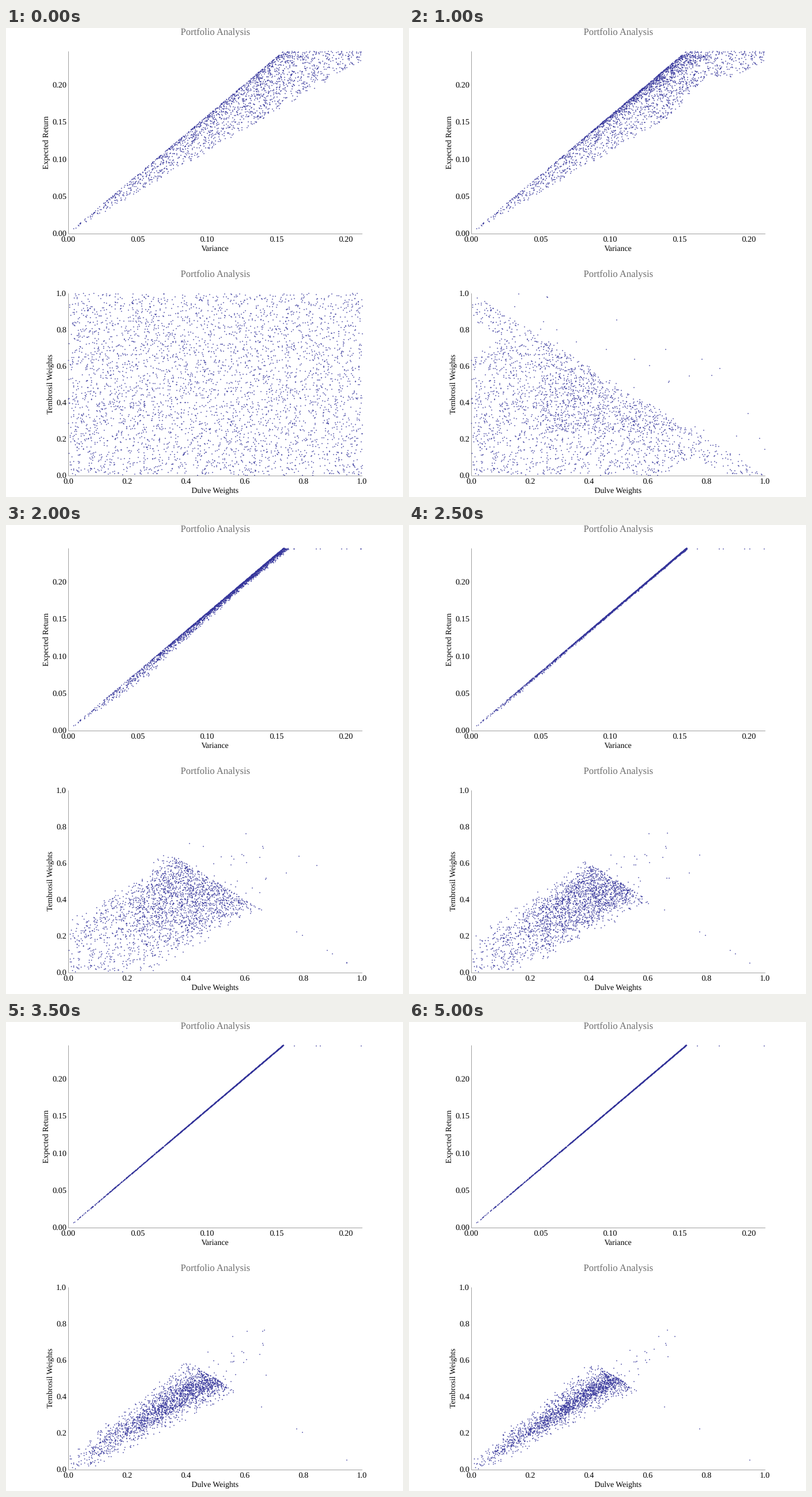
A matplotlib script for the animation above (5500 ms loop, 689 px wide and 812 px high).

```python
import numpy as np
import matplotlib.pyplot as plt
from matplotlib.animation import FuncAnimation

plt.rcParams["text.hinting"] = "none"

W, H, DPI = 689, 812, 64
FRAMES, STEP_MS = 11, 500
BLUE, AXIS, TITLE = "#35359b", "#a0a0a0", "#6e6e6e"
LEFT, RIGHT = 108, 618
TOP_Y, TOP_BASE = 40, 355
LOW_Y, LOW_BASE = 459, 774

RETURN_SPAN = TOP_BASE - TOP_Y     # full investment reaches the top edge
RISK_SPAN = 373                    # least risk at full investment, in pixels
RISK_GAIN = 1.064                  # extra risk from an unbalanced mix

PORTFOLIOS, CHILDREN, STRAYS = 3900, 480, 28

rng = np.random.default_rng(11)


def join(total, diff):
    return np.column_stack([(total + diff) / 2, (total - diff) / 2])


def settle(k):
    """Progress of the search, 0 to 1."""
    return np.clip((k - 3) / 5, 0, 1)


def balance(k, total):
    return -.022 * total * settle(k)


def band(k, total, fuzz):
    """Largest imbalance a portfolio may keep at step k."""
    if k == 2:
        lim = np.where(np.abs(total - .74) < .12, .65, 2)
    else:
        t = settle(k)
        narrow, soft = .63 * t, .1 + .58 * t
        lim = .095 + .34 * .5 ** (k - 3)
        lim = lim * (1 - narrow + narrow * total)
        lim = lim * (1 - soft + 2 * soft * fuzz)
    room = np.minimum(total, 2 - total) - np.abs(balance(k, total))
    return np.minimum(lim, room)


def child_count(k):
    return int(CHILDREN * min(k / 2, 1) * .8 ** max(k - 2, 0))


def breed(n):
    """Children fill the middle of the feasible triangle."""
    p = rng.random((n, 2))
    p = np.where(p.sum(axis=1, keepdims=True) > 1, 1 - p, p)
    return .235 + .51 * p


def first_trial():
    """Over-invested portfolios after one move, clipped at a weight of 1."""
    p = np.array([.25, .2]) + rng.random((2600, 2)) * [.75, .8]
    total = p.sum(axis=1)
    keep = (total > 1) & (rng.random(len(p)) < 1.3 * (1.6 - total))
    roof = np.column_stack([rng.normal(.36, .085, 75), np.ones(75)])
    wall = np.column_stack([np.ones(60), rng.normal(.36, .075, 60)])
    return np.vstack([p[keep][:680], roof, wall])


def edge_mixes():
    """Fully invested pairs; fewer of them survive each step."""
    first = np.append([.948, .777, .657], rng.uniform(.64, .97, 10))
    return [first[:round(3 + 10 * .5 ** (k - 3))] if k >= 3 else first[:0]
            for k in range(FRAMES)]


def build():
    start = rng.random((PORTFOLIOS, 2))
    size = start.sum(axis=1)
    inside = start[size <= 1]
    over = start[(size > 1.02) & (size < 1.48)][:STRAYS]
    p = np.vstack([over, inside, breed(CHILDREN)])
    total, diff = p.sum(axis=1), p[:, 0] - p[:, 1]
    fuzz = rng.random(len(total)) ** 1.5
    trial, edges = first_trial(), edge_mixes()
    steps = []
    for k, edge in enumerate(edges):
        if k >= 2:
            center, lim = balance(k, total), band(k, total, fuzz)
            fresh = center + lim * rng.uniform(-1, 1, len(total))
            diff = np.where(np.abs(diff - center) > lim, fresh, diff)
        end = STRAYS + len(inside) + child_count(k)
        mix = join(total[:end], diff[:end])
        if k == 0:
            mix = start
        elif k == 1:
            mix = np.vstack([mix[STRAYS:], trial])
        mix = np.vstack([mix, np.column_stack([edge, 1 - edge])])
        steps.append((mix, total[STRAYS:end], diff[STRAYS:end], edge))
    return steps


def risk_xy(total, diff, spread):
    excess = np.sqrt(1 + RISK_GAIN * (diff / total) ** 2) - 1
    x = LEFT + RISK_SPAN * total * (1 + spread * excess)
    y = TOP_BASE - RETURN_SPAN * total
    ok = x <= RIGHT + .5
    return x[ok], y[ok]


STEPS = build()

fig = plt.figure(figsize=(W / DPI, H / DPI), dpi=DPI, facecolor="white")
ax = fig.add_axes([0, 0, 1, 1])
ax.set_xlim(0, W)
ax.set_ylim(H, 0)
ax.axis("off")


def text(x, y, s, px=13.8, color="black", ha="center", rot=0):
    ax.text(x, y, s, fontsize=px * 72 / DPI, family="Liberation Serif",
            color=color, ha=ha, va="baseline", rotation=rot,
            rotation_mode="anchor")


def panel(top, base, xlabel, ylabel, ylabel_x, xticks, yticks):
    """Ticks are (label, pixel) pairs."""
    ax.plot([LEFT - .5, LEFT - .5, RIGHT], [top, base + .5, base + .5],
            color=AXIS, lw=72 / DPI, solid_capstyle="butt")
    mid = (LEFT + RIGHT) / 2
    text(mid, top - 27.5, "Portfolio Analysis", 16.6, TITLE)
    text(mid, base + 31, xlabel)
    text(ylabel_x, (top + base) / 2, ylabel, rot=90)
    for label, x in xticks:
        text(x, base + 14.5, label, 14.2)
    for label, y in yticks:
        text(105, y + 5, label, 14.2, ha="right")


def ticks(form, start, stop, step, origin, scale):
    return [(form.format(v), origin + v * scale)
            for v in np.arange(start, stop, step)]


panel(TOP_Y, TOP_BASE, "Variance", "Expected Return", 74,
      ticks("{:.2f}", 0, .21, .05, LEFT, 2410),
      ticks("{:.2f}", 0, .21, .05, TOP_BASE, -1285))
panel(LOW_Y, LOW_BASE, "Dulve Weights", "Tembrosil Weights", 81,
      ticks("{:.1f}", 0, 1.1, .2, LEFT, RIGHT - LEFT),
      ticks("{:.1f}", 0, 1.1, .2, LOW_BASE, LOW_Y - LOW_BASE))

dot = dict(ls="none", marker="o", ms=1.7 * 72 / DPI, mew=0, color=BLUE)
risk_dots, = ax.plot([], [], **dot)
mix_dots, = ax.plot([], [], **dot)


def draw(k):
    mix, total, diff, edge = STEPS[k]
    x, y = risk_xy(total, diff, (1 - settle(k)) ** 2)
    ex, ey = risk_xy(np.ones(len(edge)), 2 * edge - 1, 1)
    risk_dots.set_data(np.append(x, ex), np.append(y, ey + .8))
    mix_dots.set_data(LEFT + mix[:, 0] * (RIGHT - LEFT),
                      LOW_BASE - mix[:, 1] * (LOW_BASE - LOW_Y))
    return risk_dots, mix_dots


anim = FuncAnimation(fig, draw, frames=FRAMES, interval=STEP_MS,
                     repeat=True, repeat_delay=0)
plt.show()
```
